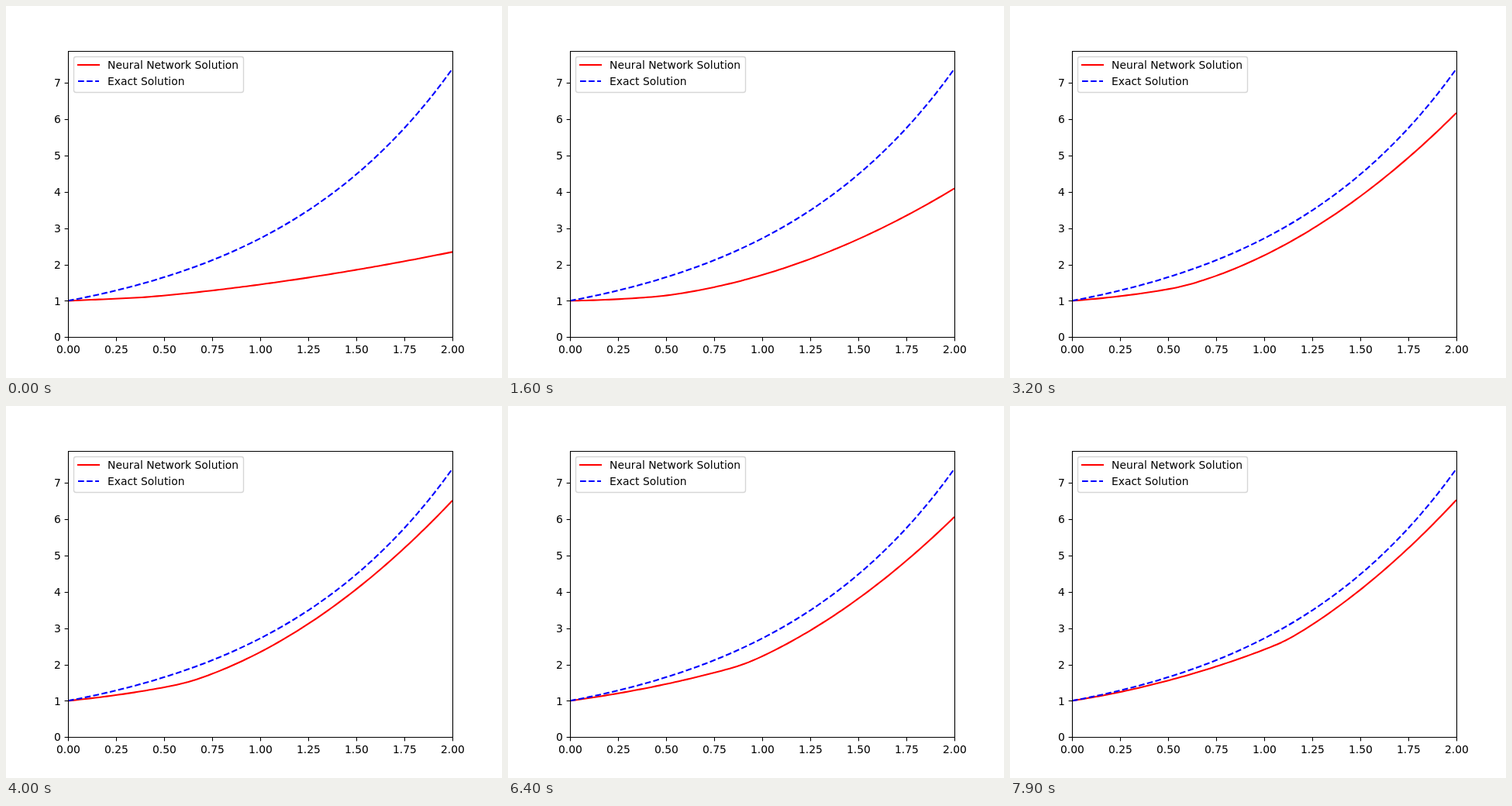
Animation, 640 px wide and 480 px high, one loop 8 s. Source, as an HTML page with a canvas:

```html
<!DOCTYPE html>
<html lang="en">
<head>
<meta charset="utf-8">
<title>Neural network solution</title>
<style>
  html, body { margin: 0; width: 100%; height: 100%; overflow: hidden; background: #fff; }
  canvas, svg { position: absolute; left: 0; top: 0; width: 640px; height: 480px; }
  text { font: 13.89px "DejaVu Sans", sans-serif; fill: #000; }
</style>
</head>
<body>
<canvas id="plot" width="640" height="480"></canvas>
<svg id="labels" viewBox="0 0 640 480"></svg>
<script>
const LOOP = 8, STEP = 0.1, POINTS = 100;
const LEFT = 80, BOTTOM = 427.2, SCALE_X = 248, SCALE_Y = 46.85;
const LINE = 2.083, DASH = [7.708, 3.333];

const ctx = document.getElementById("plot").getContext("2d");
const labels = document.getElementById("labels");

const px = x => LEFT + x * SCALE_X;
const py = y => BOTTOM - y * SCALE_Y;
const snap = v => Math.floor(v + 0.5) + 0.5;

// Key poses of the net left of its kink: seconds, N(0), slope
const POSES = [
  [0, 0.22, 0], [1.6, 0.08, 0.38], [2.4, 0.15, 0.57], [3.2, 0.38, 0.5],
  [4.8, 0.61, 0.404], [6.4, 0.71, 0.42], [7.9, 0.82, 0.583]
];

// Smooth Hermite interpolation of one column of the poses.
function pose(col, t) {
  const last = POSES.length - 1;
  let i = 0;
  while (i < last - 1 && t >= POSES[i + 1][0]) i++;
  const slope = k => {
    const a = POSES[Math.max(k - 1, 0)], b = POSES[Math.min(k + 1, last)];
    return (b[col] - a[col]) / (b[0] - a[0]);
  };
  const a = POSES[i], b = POSES[i + 1], span = b[0] - a[0];
  const u = (t - a[0]) / span, v = 1 - u;
  return v * v * (1 + 2 * u) * a[col] + u * u * (3 - 2 * u) * b[col]
    + span * u * v * (v * slope(i) - u * slope(i + 1));
}

// The right end climbs for four seconds, then swings slowly.
function endHeight(t) {
  const s = 4 - t;
  return s > 0
    ? 122 + 25.25 * s * s / (1 + (s / 3.9) ** 2.6)
    : 133.8 + 0.35 * s - 11.8 * Math.cos(Math.PI * s / 2.05);
}

// The kink drifts right, fastest around 6.3 s.
const kinkAt = t => 0.4 + 0.05 * t + 0.335 / (1 + Math.exp((6.3 - t) / 0.6));

const hinge = d => (d + Math.hypot(d, 0.06)) / 2;

// Trial solution 1 + x * N(x): N is a line plus a softened hinge.
function solution(t) {
  const start = pose(1, t), rise = pose(2, t), kink = kinkAt(t);
  const power = Math.min(1, 0.7 + t / 6);
  const end = ((BOTTOM - endHeight(t)) / SCALE_Y - 1) / 2;
  const gain = (end - start - 2 * rise) / hinge(2 - kink) ** power;
  return x => 1 + x * (start + rise * x + gain * hinge(x - kink) ** power);
}

function stroke(color, width, dash = []) {
  ctx.strokeStyle = color;
  ctx.lineWidth = width;
  ctx.setLineDash(dash);
  ctx.stroke();
}

function curve(f, color, dash) {
  ctx.beginPath();
  for (let i = 0; i < POINTS; i++) {
    const x = 2 * i / (POINTS - 1);
    ctx.lineTo(px(x), py(f(x)));
  }
  stroke(color, LINE, dash);
}

function segment(x1, y1, x2, y2, color, width, dash) {
  ctx.beginPath();
  ctx.moveTo(x1, y1);
  ctx.lineTo(x2, y2);
  stroke(color, width, dash);
}

function axes() {
  for (let i = 0; i < 9; i++) {
    const x = snap(px(i / 4));
    segment(x, 427.5, x, 432.4, "#000", 1.11);
  }
  for (let i = 0; i < 8; i++) {
    const y = snap(py(i));
    segment(80.5, y, 75.6, y, "#000", 1.11);
  }
  ctx.beginPath();
  ctx.rect(80.5, 58.5, 496, 369);
  stroke("#000", 1.11);
}

function legend() {
  ctx.beginPath();
  ctx.roundRect(87.5, 65.5, 219, 46, 2.8);
  ctx.fillStyle = "rgba(255,255,255,.8)";
  ctx.fill();
  stroke("rgba(204,204,204,.8)", 1.39);
  segment(92, 76, 121, 76, "#f00", LINE);
  segment(93, 97, 120, 97, "#00f", LINE, DASH);
}

function label(str, x, y) {
  const el = document.createElementNS(labels.namespaceURI, "text");
  el.setAttribute("x", x);
  el.setAttribute("y", y);
  el.textContent = str;
  labels.append(el);
}

function addLabels() {
  for (let i = 0; i < 9; i++) label((i / 4).toFixed(2), px(i / 4) - 15, 448);
  for (let i = 0; i < 8; i++) label(i, 62, Math.round(py(i) + 5.2));
  label("Neural Network Solution", 131, 81);
  label("Exact Solution", 131, 102);
}

function draw(seconds) {
  const t = Math.floor((seconds % LOOP) / STEP) * STEP;
  ctx.fillStyle = "#fff";
  ctx.fillRect(0, 0, 640, 480);
  ctx.save();
  ctx.beginPath();
  ctx.rect(LEFT, 58, 496, 369);
  ctx.clip();
  ctx.lineJoin = "round";
  curve(solution(t), "#f00");
  curve(Math.exp, "#00f", DASH);
  ctx.restore();
  axes();
  legend();
}

addLabels();
const begin = performance.now();
function tick() {
  draw((performance.now() - begin) / 1000);
  requestAnimationFrame(tick);
}
tick();
</script>
</body>
</html>
```
